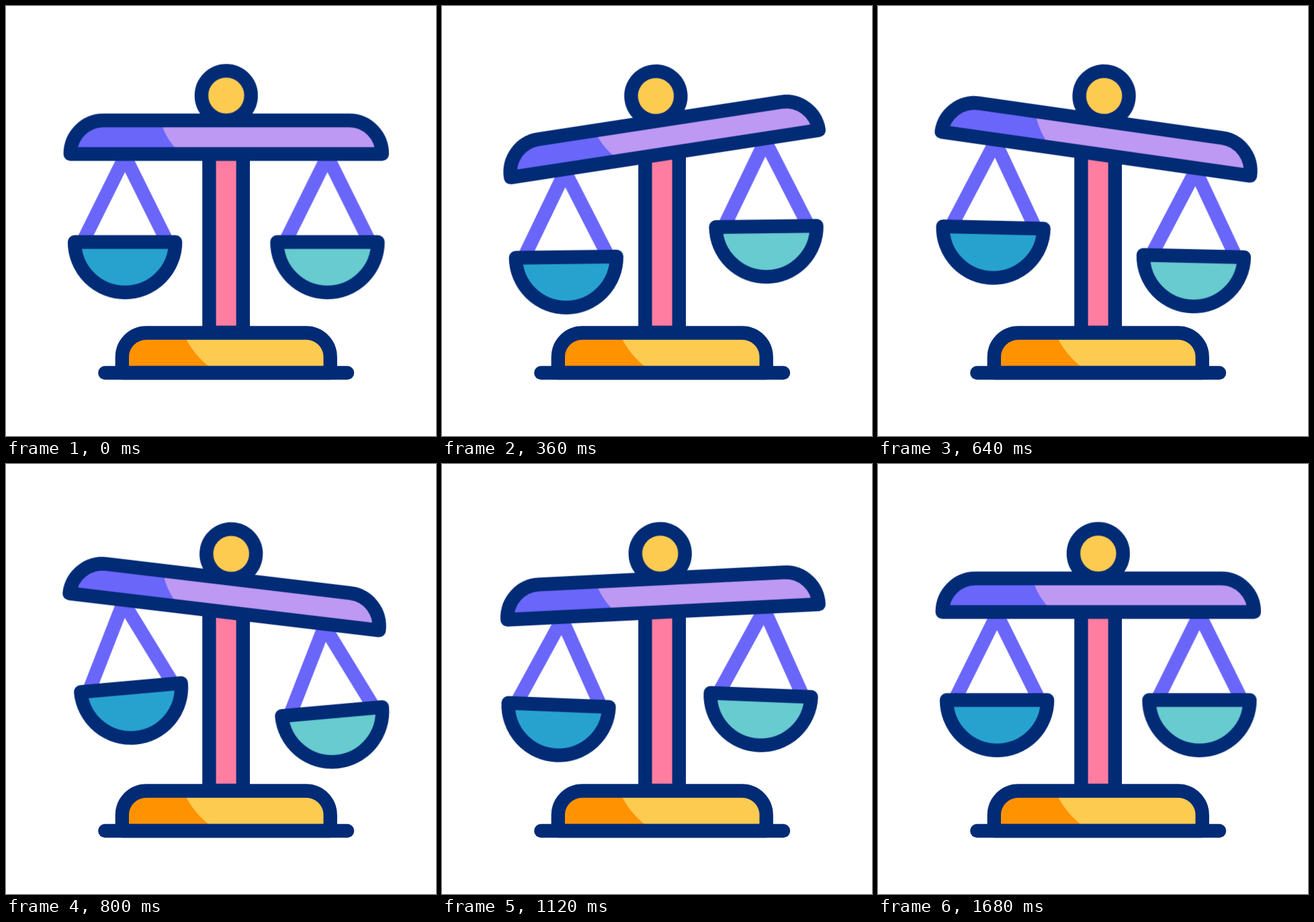
These frames come from a looping animation (640 px wide and 640 px high, 1.72 s). An HTML page without scripts:

```html
<!DOCTYPE html>
<html lang="en">
<head>
<meta charset="utf-8">
<title>Balance scale</title>
<style>
  html, body { margin: 0; width: 100%; height: 100%; overflow: hidden; background: #fff; }
  svg { display: block; width: 100%; height: 100%; }
  .outline { stroke: #022b76; stroke-width: 20.4; stroke-linecap: round; stroke-linejoin: round; }
  .strings { fill: none; stroke: #6a66fa; stroke-width: 20.4; }
  .beam, .pan {
    transform-origin: 0 0;
    animation: 1720ms cubic-bezier(.333, 0, .667, 1) infinite;
  }
  .beam { animation-name: tilt; }
  .pan { animation-name: swing; }

  @keyframes tilt {
    0%, 2.33% { transform: rotate(0deg); }
    18.72% { transform: rotate(-9.3deg); }
    40.12% { transform: rotate(9deg); }
    63.66% { transform: rotate(-2.9deg); }
    80.23%, 100% { transform: rotate(0deg); }
  }
  /* Relative to the beam */
  @keyframes swing {
    0%, 2.33% { transform: rotate(0deg); }
    22.67% { transform: rotate(8.2deg); }
    44.77% { transform: rotate(-12.3deg); }
    64.53% { transform: rotate(5.15deg); }
    81.4% { transform: rotate(-1deg); }
    97.67%, 100% { transform: rotate(0deg); }
  }
</style>
</head>
<body>
<svg viewBox="0 0 640 640">
  <defs>
    <g id="hanging-pan">
      <path class="strings" d="M-62 125 0 0 62 125"/>
      <path class="outline" d="M-75 127H75A75 75 0 0 1-75 127Z"/>
    </g>
    <path id="bar" d="M-232.1 25A49.3 50 0 0 1-182.8-25H183.2A48.8 50 0 0 1 232 25Z"/>
    <path id="base" d="M172.8 546V522.5A36 36 0 0 1 208.8 486.5H446.7A36 36 0 0 1 482.7 522.5V546Z"/>
    <clipPath id="bar-clip"><use href="#bar"/></clipPath>
    <clipPath id="base-clip"><use href="#base"/></clipPath>
  </defs>

  <rect class="outline" x="302.4" y="205" width="50.4" height="281" fill="#fe7da0"/>

  <use href="#base" fill="#fdcb50"/>
  <path clip-path="url(#base-clip)" fill="#ff9201" d="M160 480H261L264 487Q278 520 308 541V550H160Z"/>
  <use class="outline" href="#base" fill="none"/>
  <path class="outline" d="M147.3 546H508"/>

  <g transform="translate(327.8 195.3)">
    <g class="beam">
      <g transform="translate(-150.7 29)"><use class="pan" href="#hanging-pan" fill="#27a2ce"/></g>
      <g transform="translate(150.6 29)"><use class="pan" href="#hanging-pan" fill="#67cbd0"/></g>
      <use href="#bar" fill="#bd99f3"/>
      <path clip-path="url(#bar-clip)" fill="#6a66fa" d="M-240-25H-97.8Q-91.8 1-67.8 25H-240Z"/>
      <use class="outline" href="#bar" fill="none"/>
      <circle class="outline" cy="-62" r="36.9" fill="#fdcb50"/>
    </g>
  </g>
</svg>
</body>
</html>
```
